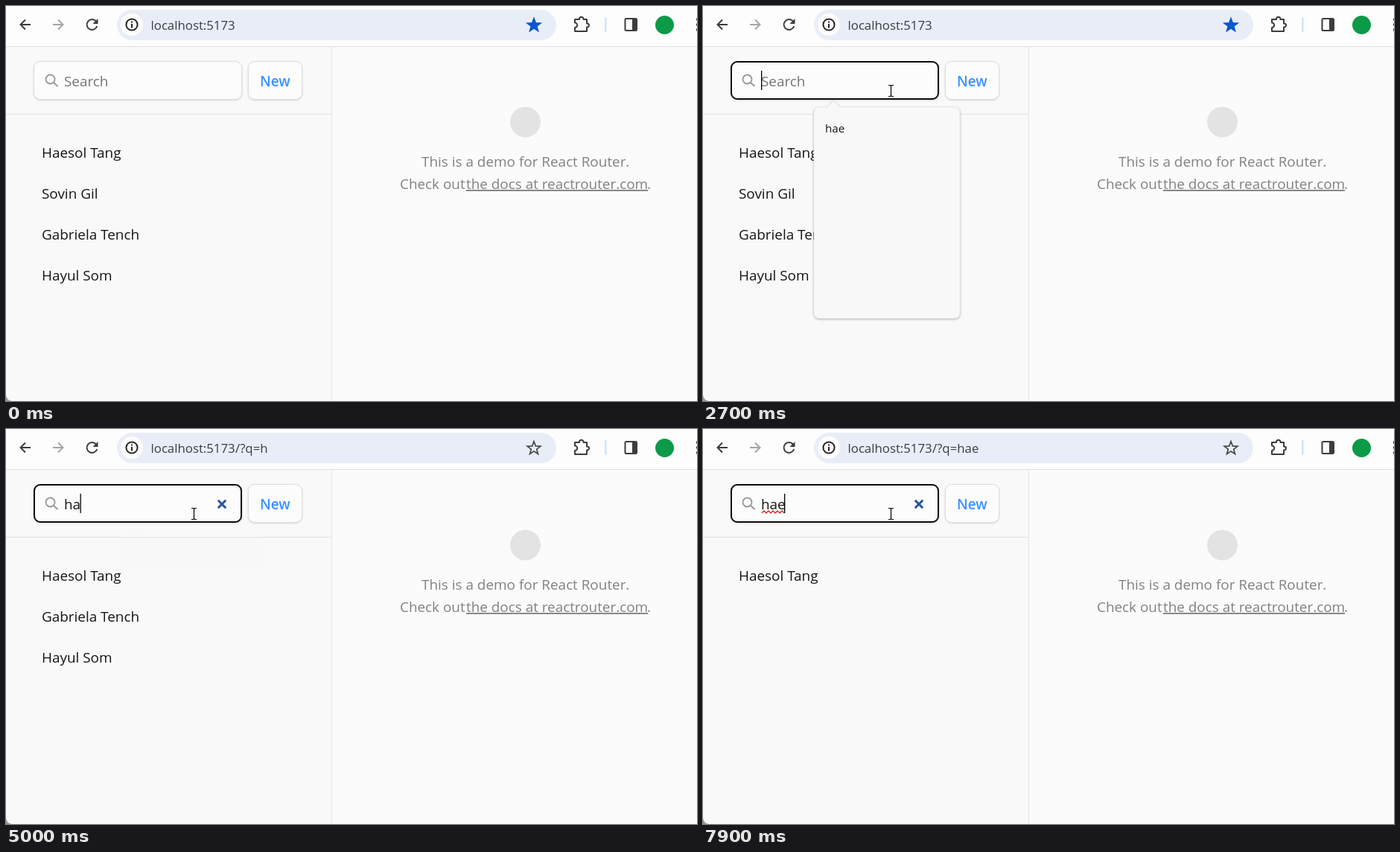
Write an HTML page that moves like this. It is 928 px wide and 531 px high and loops after 8 s.

```html
<!DOCTYPE html>
<html lang="en">
<head>
<meta charset="utf-8">
<title>Contact search</title>
<style>
  html, body { margin: 0; width: 100%; height: 100%; overflow: hidden; background: #fbfbfb; }
  svg { display: block; width: 928px; height: 531px; }
  text { font: 18.9px "Open Sans", "Noto Sans", sans-serif; fill: #151515; white-space: pre; }
  .url { font-size: 16.8px; fill: #3a3d42; }
  .small { font-size: 15.2px; }
  .new { font-weight: 600; fill: #3992ff; }
  .hint { fill: #757575; }
  #detail text { fill: #818181; }
  .icon { fill: none; stroke: #3c3c3c; stroke-width: 2; }
  .shadow { filter: drop-shadow(0 1px .8px rgba(0, 0, 0, .14)); }
</style>
</head>
<body>
<svg viewBox="0 0 928 531">
  <rect width="928" height="531" fill="#fbfbfb"/>

  <!-- browser bar -->
  <rect width="928" height="54" fill="#fdfdfd"/>
  <rect y="54" width="928" height="1" fill="#e1e1e1"/>
  <rect x="149" y="5" width="590" height="41" rx="20.5" fill="#e9edf7"/>
  <path class="icon" d="M33 25H20M26 18.5L19.5 25L26 31.5"/>
  <path class="icon" style="stroke:#a5a5a5" d="M63 25H76M70 18.5L76.5 25L70 31.5"/>
  <path class="icon" d="M121 20.5A7 7 0 1 0 122.3 27"/>
  <path d="M123.5 17V24H116.5Z" fill="#3c3c3c"/>
  <circle cx="169" cy="25" r="15" fill="#fdfdfd"/>
  <circle class="icon" cx="169" cy="25" r="7.6" style="stroke:#222"/>
  <path class="icon" style="stroke:#222" d="M169 24V29.5M169 20.5V22.5"/>
  <text class="url" x="194.5" y="32">localhost:5173</text>
  <text class="url" id="query" x="308" y="32"></text>
  <path id="star" stroke-width="1.7"/>
  <path class="icon" d="M764 18H770V17.5A2.6 2.6 0 0 1 775.5 17.5V18H780V23.5H780.5A2.5 2.5 0 0 1 780.5 28.5H780V34H764V29A3 3 0 0 0 764 22.5Z" stroke-linejoin="round"/>
  <rect x="804" y="15" width="2.5" height="20" rx="1" fill="#d0e4fa"/>
  <rect class="icon" x="831.5" y="17" width="15.5" height="16" rx="1.5"/>
  <rect x="841" y="17" width="6" height="16" fill="#3c3c3c"/>
  <circle cx="884.5" cy="25.5" r="12.5" fill="#0b9a48"/>
  <path d="M928.5 18V18.1M928.5 25V25.1M928.5 32V32.1" stroke="#3c3c3c" stroke-width="3.5" stroke-linecap="round"/>

  <!-- sidebar -->
  <rect y="55" width="437" height="476" fill="#f9f9f9"/>
  <rect x="437" y="55" width="1" height="476" fill="#e4e4e4"/>
  <rect y="145" width="437" height="1" fill="#e4e4e4"/>
  <path d="M0 523Q1 530 8 531H0Z" fill="#999"/>
  <rect id="field" class="shadow" x="37.5" y="74.5" width="279" height="51" rx="8.5" fill="#fcfcfc"/>
  <rect id="focus" x="38" y="75" width="278" height="50" rx="8" fill="#fcfcfc" stroke="#0c0c0c" stroke-width="2"/>
  <circle cx="59.5" cy="98.5" r="6" fill="none" stroke="#999" stroke-width="1.8"/>
  <path d="M64 103L69.5 108" stroke="#999" stroke-width="2"/>
  <text id="typed" x="78" y="108"></text>
  <path id="squiggle" fill="none" stroke="#e02020" stroke-width="1.3"/>
  <rect id="caret" y="87" width="1.3" height="26" fill="#000"/>
  <path id="clear" d="M284.8 95.8L295.2 106.2M295.2 95.8L284.8 106.2" stroke="#26539c" stroke-width="3"/>
  <rect class="shadow" x="325.5" y="74.5" width="72" height="51" rx="8.5" fill="#fcfcfc" stroke="#dedede"/>
  <text class="new" x="341" y="108">New</text>
  <g id="list"></g>

  <!-- detail pane -->
  <g id="detail">
    <circle cx="697.5" cy="156" r="20.5" fill="#e3e3e3"/>
    <text x="558" y="216">This is a demo for React Router.</text>
    <text x="529" y="246">Check out</text>
    <text x="618" y="246" text-decoration="underline">the docs at reactrouter.com</text>
    <text x="861" y="246">.</text>
  </g>

  <!-- suggestions -->
  <g id="popup">
    <path id="panel" fill="#f8f8f8" stroke="#e6e6e6" stroke-width=".6" style="filter:drop-shadow(0 1px 1.5px rgba(0,0,0,.3))"/>
    <text class="small" x="164" y="170">hae</text>
  </g>

  <path id="arrow" d="M0 0V16.5L3.8 13L6.3 19L9 17.8L6.5 12H11.7Z" fill="#fff" stroke="#000" stroke-linejoin="round"/>
  <path id="beam" d="M-3.5 -7.5H-1L0 -6.5L1 -7.5H3.5M0 -6.5V6.5M-3.5 7.5H-1L0 6.5L1 7.5H3.5" fill="none" stroke="#000" stroke-width="1.2"/>
</svg>

<script>
const LOOP = 8000;
const $ = id => document.getElementById(id);
const show = (id, on) => $(id).setAttribute('visibility', on ? 'visible' : 'hidden');
const set = (id, attrs) => Object.entries(attrs).forEach(([k, v]) => $(id).setAttribute(k, v));

const people = ['Haesol Tang', 'Sovin Gil', 'Gabriela Tench', 'Hayul Som'];
const FOCUS = 2500;
const typing = [[0, ''], [2800, 'h'], [5000, 'ha'], [6400, 'hae']];
const results = [[0, ''], [4000, 'h'], [5800, 'ha'], [7500, 'hae']];
const caretOn = [[FOCUS, 3700], [4250, 4750], [5000, 5500], [6000, 6900], [7400, LOOP]];
const caretX = [78, 89, 99.5, 109];
const pointer = [
  [100, 926, 86], [300, 867, 114], [500, 785, 135], [600, 736, 151], [700, 671, 174],
  [900, 566, 188], [1100, 500, 187], [1400, 400, 172], [1800, 271, 132], [2000, 252, 114]
];
const fades = [[0, 1], [3000, 1], [3200, .32], [4000, .25], [4200, 1], [5200, 1],
  [5400, .25], [5800, .25], [6000, 1], [6550, 1], [6750, .25], [7500, .25], [7700, 1]];
const popups = [[FOCUS, 0], [2650, 1], [4120, 1], [4320, 0], [5000, 0], [5150, 1], [5920, 1], [6120, 0]];

const latest = (steps, t) => steps.filter(s => s[0] <= t).pop()[1];

function track(keys, t, col = 1) {
  if (t <= keys[0][0]) return keys[0][col];
  const i = keys.findIndex(k => k[0] > t);
  if (i < 0) return keys[keys.length - 1][col];
  const a = keys[i - 1], b = keys[i];
  return a[col] + (b[col] - a[col]) * (t - a[0]) / (b[0] - a[0]);
}

function starPath(cx, cy, r) {
  return 'M' + Array.from({ length: 10 }, (_, i) => {
    const a = i * Math.PI / 5 - Math.PI / 2, d = i % 2 ? r * .42 : r;
    return `${cx + d * Math.cos(a)} ${cy + d * Math.sin(a)}`;
  }).join('L') + 'Z';
}

const panelPath = bottom => `M157 136H167L175.5 127.5L184 136H337Q345 136 345 144V${bottom - 8}` +
  `Q345 ${bottom} 337 ${bottom}H157Q149 ${bottom} 149 ${bottom - 8}V144Q149 136 157 136Z`;

people.forEach(() => {
  const row = document.createElementNS('http://www.w3.org/2000/svg', 'text');
  row.setAttribute('x', 48);
  $('list').append(row);
});
set('star', { d: starPath(709, 26, 9.3) });
set('squiggle', {
  d: 'M' + Array.from({ length: 11 }, (_, i) => `${79 + i * 3} ${i % 2 ? 110 : 113}`).join('L')
});

function draw(t) {
  const typed = latest(typing, t), query = latest(results, t);

  $('query').textContent = query && '/?q=' + query;
  set('star', query ? { fill: 'none', stroke: '#444' } : { fill: '#0b57d0', stroke: '#0b57d0' });

  const found = people.filter(name => name.toLowerCase().includes(query));
  [...$('list').children].forEach((row, i) => {
    row.textContent = found[i] || '';
    row.setAttribute('y', 204 + 55 * i);
  });

  $('typed').textContent = typed || 'Search';
  set('typed', { class: typed ? '' : 'hint' });
  set('field', { stroke: t >= 2000 ? '#c2c2c2' : '#dedede' });
  show('focus', t >= FOCUS);
  show('clear', typed);
  show('squiggle', t >= 7600);
  show('caret', caretOn.some(([from, to]) => t >= from && t < to));
  set('caret', { x: caretX[typed.length] });

  set('detail', { opacity: track(fades, t) });

  const visible = track(popups, t), scale = .97 + .03 * visible;
  set('panel', { d: panelPath(typed ? 192.5 : 420) });
  set('popup', {
    opacity: visible,
    transform: `translate(247 164) scale(${scale}) translate(-247 -164)`
  });

  const x = track(pointer, t), y = track(pointer, t, 2), inField = t >= 1900;
  set('arrow', { transform: `translate(${x} ${y})` });
  set('beam', { transform: `translate(${x + .5} ${y})` });
  show('arrow', t >= 100 && !inField);
  show('beam', inField);
}

const start = performance.now();
function tick() {
  draw((performance.now() - start) % LOOP);
  requestAnimationFrame(tick);
}
tick();
</script>
</body>
</html>
```
